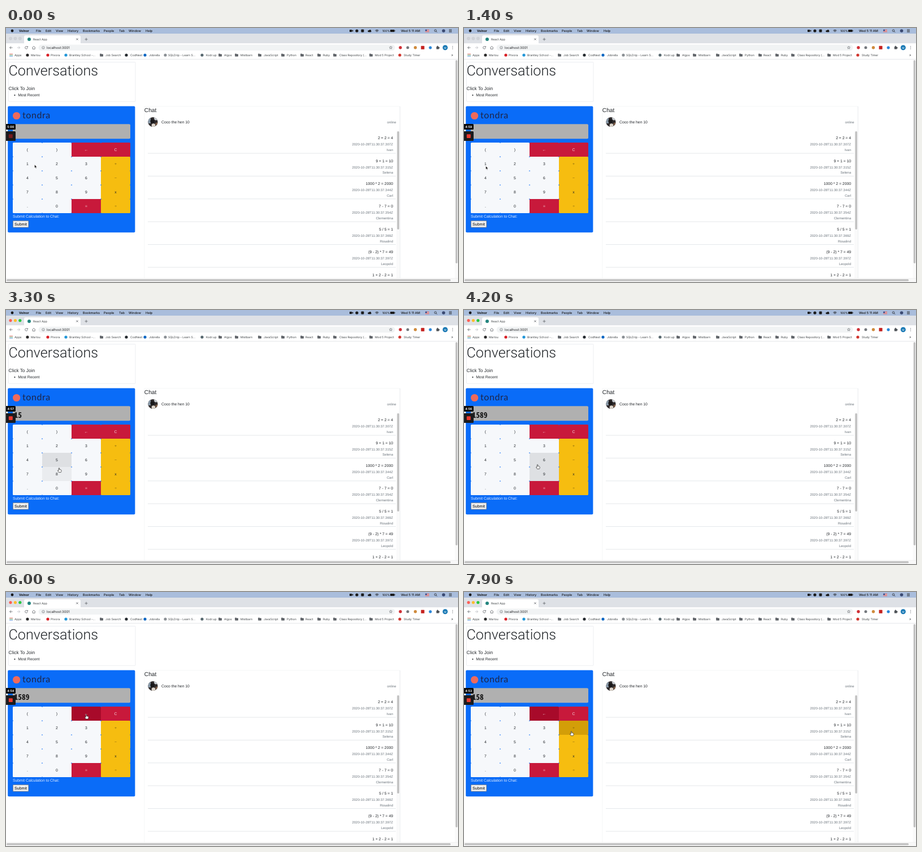
An HTML page with a canvas that plays this animation: 800x450 px, repeating every 8000 ms.

```html
<!DOCTYPE html>
<html lang="en">
<head>
<meta charset="utf-8">
<title>Calculator chat</title>
<style>
html, body { margin: 0; width: 100%; height: 100%; overflow: hidden; background: #fff; }
canvas, svg { position: absolute; left: 0; top: 0; width: 800px; height: 450px; }
text { text-rendering: geometricPrecision; white-space: pre; }
.ui { font-family: Inter, "Open Sans", sans-serif; }
.page { font-family: "Liberation Sans", Arial, sans-serif; }
.title { font-family: Roboto, "Liberation Sans", sans-serif; font-weight: 300; }
.brand { font-family: Lato, sans-serif; letter-spacing: .6px; }
.digits { font-family: "Noto Sans Mono CJK JP", "Noto Sans CJK JP", "Noto Sans Mono", monospace; font-weight: 700; }
</style>
</head>
<body>
<canvas id="stage" width="800" height="450"></canvas>
<svg id="over" viewBox="0 0 800 450" xmlns="http://www.w3.org/2000/svg">
  <defs><clipPath id="pane"><rect x="245" y="182" width="446" height="261"/></clipPath></defs>
  <g id="words"></g>
  <g id="list" clip-path="url(#pane)"></g>
  <g id="badge">
    <path d="M0 170H15.5Q17 170 17 171.5V178.5Q17 180 15.5 180H0Z" fill="#0c0c0c"/>
    <path d="M0 183H15.5Q17 183 17 184.5V198.5Q17 200 15.5 200H0Z" fill="#1b1b1d"/>
    <rect id="rec" x="4.8" y="188.2" width="7" height="6.8" rx="1"/>
  </g>
  <path id="arrow" d="M0 0V6L1.4 4.8 2.4 7 3.4 6.5 2.4 4.4H4.3Z" fill="#111" stroke="#fff" stroke-width=".5"/>
  <path id="hand" d="M-.8.2Q0-.6.7.2V2.6Q3.6 2.5 4 3.9V5.4Q3.9 6.6 3.2 7.6H-.7Q-1.6 6-2.5 4.6-2.5 3.6-.8 4.4Z" fill="#fff" stroke="#222" stroke-width=".7" stroke-linejoin="round"/>
</svg>
<script>
const LOOP = 8000;
const $ = id => document.getElementById(id);
const c = $('stage').getContext('2d');

/* ---------- text ---------- */
function text(str, x, y, size, o = {}) {
  const el = document.createElementNS('http://www.w3.org/2000/svg', 'text');
  el.setAttribute('x', x);
  el.setAttribute('y', y);
  el.setAttribute('font-size', size);
  el.setAttribute('class', o.font || 'page');
  el.setAttribute('fill', o.fill || '#212529');
  el.setAttribute('text-anchor', o.anchor || 'start');
  if (o.weight) el.setAttribute('font-weight', o.weight);
  el.textContent = str;
  (o.into || $('words')).appendChild(el);
  return el;
}
const ui = (str, x, y, size, fill = '#3c4043', weight = 400) =>
  text(str, x, y, size, { font: 'ui', fill, weight });

// [label, text x, icon x, icon kind or colour]
const bookmarks = [
  ['Apps', 15, 9, 'grid'], ['Marlou', 44, 38, '#2a2a2a'], ['Plivora', 79, 74, '#d81f26'],
  ['Brantley School -...', 112, 106, '#2196d8'], ['Job Search', 176, 169, 'dir'],
  ['CodNest', 220, 213, '#24292e'], ['Jobrella', 253, 246, '#0a66c2'],
  ['SQLDrip - Learn S...', 287, 282, '#8a8f94'], ['Kodr.up', 354, 347, '#56676e'],
  ['Algos', 386, 379, 'dir'], ['Mistbarn', 415, 408, 'dir'], ['JavaScript', 456, 449, 'dir'],
  ['Python', 497, 490, 'dir'], ['React', 530, 524, 'dir'], ['Ruby', 561, 554, 'dir'],
  ['Class Repository (...', 590, 582, 'dir'], ['Mod 5 Project', 653, 646, 'dir'],
  ['Study Timer', 704, 697, '#d0342c']
];
const messages = [
  ['2 + 2 = 4', '307', 'Ivan'], ['9 + 1 = 10', '315', 'Selena'], ['1000 * 2 = 2000', '344', 'Carl'],
  ['7 - 7 = 0', '354', 'Clementina'], ['5 / 5 = 1', '369', 'Rosalind'],
  ['(9 - 2) * 7 = 49', '397', 'Leopold'], ['1 + 2 - 2 = 1', '412', 'Oscar']
];
const PITCH = 40.4;

ui('Velnor', 23, 7, 5.6, '#111', 700);
[['File', 53], ['Edit', 70], ['View', 88], ['History', 109], ['Bookmarks', 136], ['People', 173],
 ['Tab', 200], ['Window', 217], ['Help', 247]].forEach(([s, x]) => ui(s, x, 7, 5.6, '#151515', 500));
ui('100%', 666, 6.8, 5, '#151515', 500);
ui('Wed 5:11 AM', 699, 7, 5.6, '#151515', 500);
ui('React App', 48, 22, 5.1);
ui('localhost:3001', 72, 37, 5.95, '#202124');
bookmarks.forEach(([s, x]) => ui(s, x, 50, 5.1));
ui('»', 788, 50, 6);
text('M', 777.3, 36.6, 4.6, { font: 'ui', fill: '#fff', anchor: 'middle' });

text('Conversations', 4.5, 84.3, 25.2, { font: 'title' });
text('Click To Join', 4.6, 109.5, 8.3);
text('Most Recent', 21.2, 121.3, 6.8);
text('tondra', 29, 160.3, 16, { font: 'brand', fill: '#1f2547' });
text('Submit Calculation to Chat:', 12, 335.5, 6.8, { fill: '#e4eeff' });
text('Submit', 26, 350.1, 7, { fill: '#000', anchor: 'middle' });
text('Chat', 244.8, 148.5, 10.2);
text('Coco the hen 10', 275, 169, 6.8);
text('online', 690.5, 168.6, 6, { fill: '#6c757d', anchor: 'end' });
messages.forEach(([sum, ms, who], i) => {
  const y = 197.2 + i * PITCH, o = { anchor: 'end', into: $('list') };
  text(sum, 685, y, 6.8, o);
  text(`2020-10-28T11:30:37.${ms}Z`, 685, y + 11, 6, { ...o, fill: '#6c757d' });
  text(who, 685, y + 20.7, 6, { ...o, fill: '#6c757d' });
});

/* ---------- keypad ---------- */
const LIGHT = [[246, 248, 251], [222, 224, 227]];
const RED = [[200, 25, 59], [168, 10, 42]];
const GOLD = [[246, 189, 16], [211, 158, 8]];
const keys = [...'()←C123+456−789x.0=÷'].map((label, i) => {
  const col = i % 4, row = i >> 2;
  const tone = '←C='.includes(label) ? RED : col === 3 ? GOLD : LIGHT;
  return { label, tone, x: 12 + col * 52, y: 203 + row * 25 };
});
keys.forEach(k => text(k.label, k.x + 26, k.y + 14.9, 6.8, {
  anchor: 'middle', fill: k.tone === RED ? '#f4dde2' : '+−÷'.includes(k.label) ? '#7d620f' : '#212529'
}));
const screen = text('', 14.5, 190.8, 13.5, { font: 'digits', fill: '#151515' });
const clock = text('', 8.2, 177, 5.2, { font: 'ui', weight: 700, fill: '#fff', anchor: 'middle', into: $('badge') });

/* ---------- timeline ---------- */
const ACTIVE = 2100;
// [time, pointer tip x, y]
const path = [
  [0, 50.5, 242], [700, 50, 242], [1400, 38.5, 244.5], [1900, 38, 242], [2250, 38, 242],
  [2750, 88, 268], [3050, 89, 268], [3300, 94, 280], [3500, 94, 286], [3750, 138, 289],
  [3900, 138, 287], [4100, 130.3, 274], [4300, 130, 274], [5500, 142, 217], [6250, 142, 217.5],
  [6900, 46, 284], [7130, 60, 284], [7200, 98, 279.5], [7300, 101, 279], [7880, 190, 247], [LOOP, 190, 247]
];
const focus = [[0, ''], [ACTIVE, '1'], [2900, '5'], [3500, '8'], [3850, '9'], [5800, '←']];
const typed = [[0, ''], [ACTIVE, '1'], [2900, '15'], [3500, '158'], [3850, '1589'], [6150, '158']];

const at = (steps, t) => steps.reduce((v, s) => t >= s[0] ? s[1] : v, '');
function pointer(t) {
  const i = Math.max(1, path.findIndex(p => p[0] > t));
  const [t0, x0, y0] = path[i - 1], [t1, x1, y1] = path[i];
  const u = Math.min(1, Math.max(0, (t - t0) / (t1 - t0))), e = u * u * (3 - 2 * u);
  return [x0 + (x1 - x0) * e, y0 + (y1 - y0) * e];
}
function lit(k, t) {
  if (t < ACTIVE) return 0;
  const [x, y] = pointer(t);
  const over = x >= k.x && x < k.x + 52 && y >= k.y && y < k.y + 25;
  return over || at(focus, t) === k.label ? 1 : 0;
}
// a 150 ms colour fade is the mean of the state over that time
function glow(k, t) {
  let sum = 0;
  for (let i = 0; i < 10; i++) sum += lit(k, t - i * 15);
  return sum / 10;
}
const mix = (a, b, u) => `rgb(${a.map((v, i) => Math.round(v + (b[i] - v) * u))})`;

/* ---------- shapes ---------- */
function box(x, y, w, h, fill, r = 0, stroke, lw = .6) {
  c.beginPath();
  c.roundRect(x, y, w, h, r);
  if (fill) { c.fillStyle = fill; c.fill(); }
  if (stroke) { c.strokeStyle = stroke; c.lineWidth = lw; c.stroke(); }
}
function dot(x, y, r, fill, stroke, lw = .7) {
  c.beginPath();
  c.arc(x, y, r, 0, 7);
  if (fill) { c.fillStyle = fill; c.fill(); }
  if (stroke) { c.strokeStyle = stroke; c.lineWidth = lw; c.stroke(); }
}
function line(pts, color = '#5f6368', lw = .8) {
  c.beginPath();
  for (let i = 0; i < pts.length; i += 2) c.lineTo(pts[i], pts[i + 1]);
  c.strokeStyle = color;
  c.lineWidth = lw;
  c.stroke();
}
function arc(x, y, r, a, b, color, lw = .8) {
  c.beginPath();
  c.arc(x, y, r, a, b);
  c.strokeStyle = color;
  c.lineWidth = lw;
  c.stroke();
}

function menuBar() {
  const ink = '#1a1a1a';
  box(0, 0, 800, 10, '#a9bddc');
  dot(11, 5, 2.4, ink);
  box(608, 3, 4.4, 4, ink, .8);
  box(612.8, 3.8, 1.6, 2.4, ink);
  dot(621, 5, 2.6, ink);
  box(628.5, 2.5, 5, 5, ink, 1);
  dot(642, 5.6, 1.7, ink);
  dot(644.3, 5, 2, ink);
  box(641.5, 5, 5, 2.3, ink, 1);
  [1.2, 2.7, 4.2].forEach(r => arc(656.5, 7.6, r, Math.PI * 1.25, Math.PI * 1.75, ink, .9));
  box(680, 3, 7.6, 4, ink, .8);
  box(688, 4.2, .8, 1.6, ink);
  box(742, 2.8, 7, 4.6, '#f3f3f3');
  for (let i = 0; i < 3; i++) box(742, 2.8 + i * 1.8, 7, .9, '#c33a45');
  box(742, 2.8, 3, 2.5, '#34508f');
  dot(760, 4.6, 1.8, null, ink);
  line([761.3, 5.9, 763, 7.6], ink);
  dot(774.5, 5, 2.8, '#3b4a72');
  [3, 5, 7].forEach(y => line([784, y, 789, y], ink, .8));
}

function browser(t) {
  box(0, 10, 800, 17.5, '#dee1e6');
  const on = t >= ACTIVE;
  ['#fe5f57', '#febc2e', '#28c840'].forEach((col, i) =>
    dot(8 + i * 8.4, 18.6, 2.6, on ? col : '#d0d3d8', on ? null : '#c3c6cb', .4));
  box(32, 13, 100, 15, '#fff', [3, 3, 0, 0]);
  dot(41, 20, 3, '#24857f');
  line([124.3, 18.3, 127.5, 21.5]);
  line([127.5, 18.3, 124.3, 21.5]);
  line([139.5, 20, 144.5, 20]);
  line([142, 17.5, 142, 22.5]);
  box(0, 27.3, 800, 28, '#fff');

  line([11.5, 34.8, 6.7, 34.8]);
  line([9, 32.4, 6.6, 34.8, 9, 37.2]);
  line([19.8, 34.8, 24.6, 34.8], '#b9bcc0');
  line([22.3, 32.4, 24.7, 34.8, 22.3, 37.2], '#b9bcc0');
  arc(36, 34.8, 2.3, .3, 5.5, '#5f6368');
  line([38.5, 32, 38.5, 34, 36.6, 34]);
  line([46.4, 34.9, 49.2, 32.3, 52, 34.9]);
  line([47.2, 34.6, 47.2, 37.3, 51.2, 37.3, 51.2, 34.6]);
  box(57.5, 29.6, 631, 10.4, '#f1f3f4', 5.2);
  dot(66, 34.8, 2.3, null, '#5f6368', .6);
  line([66, 34.4, 66, 36.2], '#5f6368', .6);

  const star = [];
  for (let i = 0; i <= 10; i++) {
    const a = i * Math.PI / 5 - Math.PI / 2, r = i % 2 ? 1.2 : 2.7;
    star.push(681 + r * Math.cos(a), 34.8 + r * Math.sin(a));
  }
  line(star, '#5f6368', .6);
  dot(698, 34.8, 2.7, '#cf2f35');
  dot(711, 34.8, 2.5, '#74787d');
  dot(724.5, 34.8, 2.7, '#cf8a3d');
  box(734.5, 31.8, 6, 6, '#c5221f', .6);
  dot(751, 34.8, 2.6, '#2b86d9');
  box(761.7, 33, 4.6, 4.6, '#4f5358', .7);
  dot(763.8, 32.7, 1.1, '#4f5358');
  dot(766.5, 35.2, 1.1, '#4f5358');
  dot(777.3, 34.8, 4.5, '#1878b4');
  [32.6, 34.8, 37].forEach(y => dot(790.5, y, .6, '#5f6368'));

  bookmarks.forEach(([, , x, kind]) => {
    if (kind === 'dir') {
      box(x - 2.8, 45.6, 2.8, 2, '#5f6368', .5);
      box(x - 2.8, 46.2, 5.8, 4.2, '#5f6368', .6);
    } else if (kind === 'grid') {
      ['#d64b3e', '#3c9a55', '#4285d8'].forEach((col, i) => {
        for (let j = 0; j < 3; j++) box(x - 2.6 + j * 2, 45.4 + i * 2, 1.3, 1.3, col);
      });
    } else dot(x, 48, 2.6, kind);
  });
  line([0, 55.4, 800, 55.4], '#dadce0', .7);
}

function page(t) {
  box(4.5, 60.5, 224.5, 69.8, null, 1, '#dfe3e7');
  dot(15.4, 119, 1.1, '#212529');

  box(3.2, 138.4, 225.2, 223.8, '#0a6cf8', 2);
  dot(18.6, 155.5, 6.6, '#ee6a5c');
  box(12, 170.2, 208, 26, '#b0b0b0', 2);
  keys.forEach(k => box(k.x, k.y, 52, 25, mix(k.tone[0], k.tone[1], glow(k, t)), 1.5));
  box(12.3, 341.6, 27.6, 11.6, '#efefef', .8, '#5c6470', .7);

  line([245, 139, 697.3, 139], '#f1f2f4', .7);
  line([245, 139, 245, 443], '#f1f2f4', .7);
  line([697.3, 139, 697.3, 443], '#dfe3e7', .7);
  c.save();
  c.beginPath();
  c.arc(260, 166.5, 8.6, 0, 7);
  c.clip();
  box(251, 157, 18, 19, '#2e2a2b');
  box(251, 157, 5, 12, '#8797a6');
  dot(265.5, 160, 3.4, '#c7cdd2');
  dot(259, 165, 3.6, '#19181a');
  dot(261, 172.5, 3.3, '#ded6cc');
  dot(267, 170, 2.6, '#7a5a45');
  c.restore();
  for (let i = 0; i < 6; i++) {
    const y = 222 + i * PITCH;
    line([251, y, 690, y], '#d9dde1', .7);
  }
  box(691, 182, 6, 261, '#fafafa');
  box(692.3, 183, 3.6, 174, '#c1c1c1', 1.8);

  box(794.5, 56, 5.5, 388, '#fafafa');
  box(795.7, 57, 3.4, 360, '#c1c1c1', 1.7);
  box(0, 443.5, 800, 6.5, '#f8f8f8');
  line([0, 443.5, 800, 443.5], '#e8e8e8', .5);
  box(1, 445.1, 786, 3.5, '#c1c1c1', 1.7);
}

function draw(t) {
  c.fillStyle = '#fff';
  c.fillRect(0, 0, 800, 450);
  menuBar();
  browser(t);
  page(t);

  screen.textContent = at(typed, t);
  const left = 300 - Math.max(0, Math.floor((t + 50) / 1000));
  clock.textContent = `${Math.floor(left / 60)}:${String(left % 60).padStart(2, '0')}`;
  $('rec').setAttribute('fill', mix([118, 28, 30], [235, 57, 46], Math.min(1, t / 900)));

  const [x, y] = pointer(t), hand = t >= ACTIVE;
  $('arrow').style.display = hand ? 'none' : '';
  $('hand').style.display = hand ? '' : 'none';
  $(hand ? 'hand' : 'arrow').setAttribute('transform', `translate(${x} ${y})`);
}

const start = performance.now();
function tick() {
  draw((performance.now() - start) % LOOP);
  requestAnimationFrame(tick);
}
tick();
</script>
</body>
</html>
```
